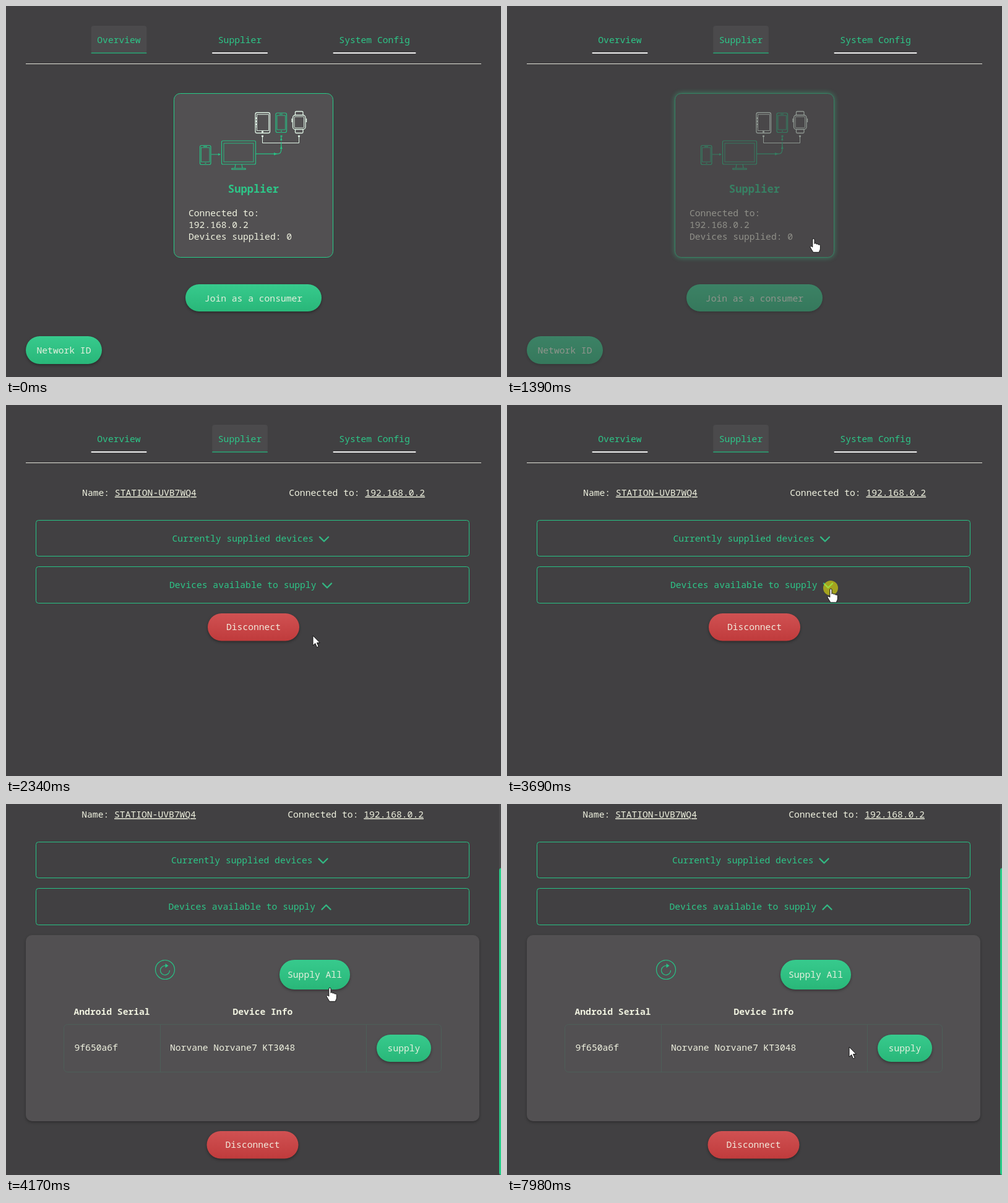
These frames come from a looping animation (800x600 px, 8 s). An HTML page:

```html
<!DOCTYPE html>
<html lang="en">
<head>
<meta charset="utf-8">
<title>Device supplier</title>
<style>
html, body { margin: 0; width: 100%; height: 100%; overflow: hidden; background: #414042; }
svg { overflow: visible; }
#stage { display: block; overflow: hidden; }
text { font: 14.66px "Noto Sans Mono", monospace; fill: #f0f2e0; white-space: pre; }
.mid { text-anchor: middle; }
.bold { font-weight: bold; }
.green { fill: #2dc688; }
.u { text-decoration: underline; }
.line { fill: none; stroke: #27c285; }
.pale { fill: none; stroke: #e2f6e8; }
.btn { filter: drop-shadow(0 2px 2px rgba(0,0,0,.35)); }
.btn text { fill: #e4f0de; }
.tab rect { fill: none; }
.tab path { stroke: #f0f0f0; stroke-width: 2; }
.tab.on rect { fill: #4b4a4c; }
.tab.on path { stroke: #2f8f6a; }
.wide { width: calc(100% - 96px); }
.full { width: calc(100% - 64px); }
.chev { fill: none; stroke: #32b883; stroke-width: 2.3; stroke-linecap: round; stroke-linejoin: round; }
.grid { fill: none; stroke: #4d5f59; }
.thumb { fill: #27cc88; }
.track { fill: #4c4b4d; }
.cur { fill: #fff; stroke: #111; stroke-linejoin: round; }
</style>
</head>
<body>
<svg id="stage" width="800" height="600">
  <defs>
    <linearGradient id="gg" x2="0" y2="1"><stop stop-color="#37ca8d"/><stop offset="1" stop-color="#29b779"/></linearGradient>
    <linearGradient id="gl" x2="0" y2="1"><stop stop-color="#43cd93"/><stop offset="1" stop-color="#2ec587"/></linearGradient>
    <linearGradient id="gr" x2="0" y2="1"><stop stop-color="#d05152"/><stop offset="1" stop-color="#c03b3c"/></linearGradient>
  </defs>

  <g id="scroll">
  <svg id="page" width="800" height="600">
    <svg x="22.81%"><g class="tab"><rect x="-44.8" y="32" width="89.6" height="44" rx="4"/><path d="M-44.8 76h89.6"/><text class="mid green" y="60">Overview</text></g></svg>
    <svg x="47.25%"><g class="tab"><rect x="-44.8" y="32" width="89.6" height="44" rx="4"/><path d="M-44.8 76h89.6"/><text class="mid green" y="60">Supplier</text></g></svg>
    <svg x="74.44%"><g class="tab"><rect x="-66.8" y="32" width="133.6" height="44" rx="4"/><path d="M-66.8 76h133.6"/><text class="mid green" y="60">System Config</text></g></svg>
    <rect class="full" x="32" y="93" height="1" fill="#e3e3da"/>

    <g id="overview">
      <rect id="card" x="271.5" y="141.5" width="257" height="265" rx="10" fill="#525052" stroke="#27cc88"/>
      <g class="pale" stroke-width="1.3">
        <rect x="403" y="172.5" width="23.5" height="33" rx="2.5"/>
        <rect x="405.5" y="175.5" width="19" height="26" stroke-width=".9"/>
        <path d="M404.5 180v16" stroke-dasharray="3 2"/>
        <path d="M413 203.5h3M413 210.5h3M472 210.5h3" stroke-width="2.4"/>
        <path d="M414.5 210V221.5H473.5V210" stroke-width="1"/>
        <rect x="463.5" y="176.5" width="20.500" height="23" rx="4"/>
        <rect x="466" y="179" width="15.500" height="18" rx="1" stroke-width=".9"/>
        <path d="M467.500 176v-4q0-1.500 1.500-1.500h9.500q1.500 0 1.500 1.500v4M467.500 200v4q0 1.500 1.500 1.500h9.500q1.500 0 1.500-1.500v-4M462 182v6M485.500 182v6"/>
      </g>
      <g class="line" stroke-width="1.2">
        <rect x="436" y="173" width="17.500" height="31.500" rx="2.5"/>
        <rect x="438" y="177" width="13.500" height="23" stroke-width=".9"/>
        <path d="M442 175h5M444 202.300h2"/>
        <rect x="313.500" y="225.500" width="17.500" height="31" rx="2.5"/>
        <rect x="315.500" y="229" width="13.500" height="23" stroke-width=".9"/>
        <path d="M319 227.300h6M321.500 254.300h2M332 240h13"/>
        <rect x="348.500" y="218" width="55" height="38" rx="2"/>
        <rect x="352" y="222" width="48" height="30" stroke-width=".9"/>
        <path d="M371 256l-1 6M381 256l1 6M365 262.500h22v2h-22z"/>
        <path d="M404 239.200H439Q444.800 239.200 444.800 232V222"/>
        <path d="M444.800 222V210" stroke-dasharray="2 2"/>
        <path d="M443.500 210.500h3" stroke-width="2.400"/>
        <path d="M343 238l4 2-4 2zM433 237l5.500 2.200-5.500 2.200zM442.800 231l2-5 2 5zM443 217l1.800-4 1.800 4z" fill="#27c285" stroke="none"/>
      </g>
      <text class="mid bold green" x="400" y="302" style="font-size:17.15px">Supplier</text>
      <g id="info">
        <text x="295" y="340">Connected to:</text>
        <text x="295" y="359">192.168.0.2</text>
        <text x="295" y="378">Devices supplied: 0</text>
      </g>
      <g class="btn"><rect x="290" y="450" width="220" height="44" rx="22" fill="url(#gg)"/><text class="mid" x="400" y="478">Join as a consumer</text></g>
      <g class="btn"><rect x="32" y="534" width="123" height="45" rx="22.5" fill="url(#gg)"/><text class="mid" x="93.500" y="562">Network ID</text></g>
    </g>

    <g id="supplier">
      <text class="mid" x="26.93%" y="147">Name: <tspan class="u">STATION-UVB7WQ4</tspan></text>
      <text class="mid" x="70.9%" y="147">Connected to: <tspan class="u">192.168.0.2</tspan></text>
      <rect class="line wide" x="48.5" y="186.5" height="58" rx="4" style="width:calc(100% - 97px)"/>
      <rect class="line wide" x="48.5" y="261.500" height="59" rx="4" style="width:calc(100% - 97px)"/>
      <svg x="50%">
        <text class="green" x="-131.500" y="221">Currently supplied devices</text>
        <path class="chev" d="M107 213.500l7 7 7-7"/>
        <text class="green" x="-136" y="296">Devices available to supply</text>
        <path class="chev" id="chev"/>
        <g class="btn" id="leave"><rect x="-74" y="337" width="148" height="44.500" rx="22.200" fill="url(#gr)"/><text class="mid" y="364" style="fill:#f2eadc">Disconnect</text></g>
      </svg>
      <g id="panel">
        <rect class="full" x="32" y="337" height="301" rx="10" fill="#525052" style="filter:drop-shadow(0 2px 2px rgba(0,0,0,.3))"/>
        <g class="line" stroke-width="1.2">
          <circle cx="257" cy="393" r="15.500"/>
          <path d="M264.500 394A7.500 7.500 0 1 1 259 386.800"/>
          <path d="M257.500 383l5 3.500-5 3.500z" fill="#27c285" stroke="none"/>
        </g>
        <g class="btn">
          <rect x="442" y="377" width="114" height="48" rx="24" fill="url(#gg)"/>
          <rect id="hover" x="442" y="377" width="114" height="48" rx="24" fill="url(#gl)"/>
          <text class="mid" x="499" y="406">Supply All</text>
        </g>
        <text class="bold" x="109.500" y="466">Android Serial</text>
        <text class="bold" x="366.500" y="466">Device Info</text>
        <rect class="grid" x="93.500" y="481.500" width="610" height="77" rx="6"/>
        <path class="grid" d="M249.500 482v76M582.500 482v76"/>
        <text x="110.500" y="524">9f650a6f</text>
        <text x="265" y="524">Norvane Norvane7 KT3048</text>
        <g class="btn"><rect x="599" y="498" width="88" height="44" rx="22" fill="url(#gg)"/><text class="mid" x="643" y="525">supply</text></g>
      </g>
    </g>
  </svg>
  </g>

  <g id="vbar"><rect class="track" x="797" width="3" height="600"/><rect class="thumb" id="vthumb" x="797" width="8" rx="4"/></g>
  <g id="hbar"><rect class="track" y="592" width="797" height="8"/><rect class="thumb" id="hthumb" y="592" height="8" rx="4"/><rect x="797" y="592" width="3" height="8" fill="#ddd"/></g>

  <g id="cursor">
    <circle id="click" r="12" fill="#ff0" fill-opacity=".52"/>
    <path class="cur" id="arrow" d="M0 0V16l3.800-3.500 2.700 6.300 2.700-1.200-2.700-6H11.300Z"/>
    <path class="cur" id="hand" d="M-1.200 3Q-1.200 1.200 .4 1.200T2 3V9.500Q2.400 8.500 3.700 8.700T5.200 10.300Q5.600 9.500 6.800 9.700T8.300 11.300Q8.700 10.600 9.900 10.900T11.400 12.600V17Q11.400 19.500 9.800 21.500V23.300H-.4Q-1 21.300-2.800 19L-4.700 15.600Q-5.300 14.200-4.100 13.600T-1.200 15Z"/>
  </g>
</svg>

<script>
const $ = id => document.getElementById(id);
const tabs = document.querySelectorAll('.tab');
const clamp = v => Math.max(0, Math.min(1, v));
const show = (id, on) => $(id).style.display = on ? '' : 'none';
const set = (id, name, value) => $(id).setAttribute(name, value);
const held = (t, start, size) => start + Math.floor((t - start) / size) * size;
const smooth = p => p * p * (3 - 2 * p);

// progress in n equal jumps, the first at a and the last at b
const steps = (t, a, b, n) =>
  clamp((Math.floor((t - a) / ((b - a) / (n - 1)) + 1e-6) + 1) / n);

function pointer(t) {
  const mix = (a, b, p) => a.map((v, i) => v + (b[i] - v) * p);
  if (t < 2290) return mix([554, 407.5], [495, 375], steps(t, 500, 750, 5));
  if (t < 6030) return mix([495, 375], [523, 296], smooth(steps(t, 2290, 3020, 12)));
  if (t < 6860) return mix([523, 296], [511, 388], smooth(steps(t, 6098, 6780, 11)));
  if (t < 7840) return mix([511, 388], [511, 393], steps(t, 6860, 6920, 2));
  return mix([511, 393], [553, 393], steps(t, 7840, 7980, 3));
}

function draw(t) {
  const second = t >= 1520, open = t >= 3820;

  // page change
  const rest = (1 - clamp((held(t, 1520, 70) - 1520) / 490)) ** 3;
  const offset = 318 * rest, wide = second && offset > 18;
  tabs[0].classList.toggle('on', t < 1250);
  tabs[1].classList.toggle('on', t >= 1250);
  show('overview', !second);
  set('overview', 'opacity', 1 - clamp((held(t, 1250, 70) - 1250) / 270));
  show('supplier', second);
  set('supplier', 'opacity', 1 - rest);
  set('supplier', 'transform', `translate(${offset})`);

  // hovered card
  const glow = steps(t, 560, 750, 4);
  $('card').style.filter = t < 560 ? 'none' : `drop-shadow(0 0 4px rgba(60,220,150,${glow * .9}))`;
  set('info', 'opacity', 1 - glow * .07);

  // opened list and scrolling
  const p = clamp((held(t, 3810, 70) - 3818) / 342);
  const top = open ? Math.round(125 * Math.sin(p * Math.PI / 2)) : 0;
  show('panel', open);
  set('chev', 'd', open ? 'M112 295.500l7-7 7 7' : 'M112 288.500l7 7 7-7');
  set('leave', 'transform', `translate(0 ${open ? 317 : 0})`);
  set('scroll', 'transform', `translate(0 ${-top})`);
  set('page', 'width', wide || open ? 797 : 800);
  set('hover', 'opacity', t < 6030 ? 0 : 1 - clamp((t - 6240) / 160));

  // scrollbars
  const view = wide ? 592 : 600, total = open ? 725 : 600;
  show('vbar', wide || open);
  show('hbar', wide);
  set('vthumb', 'y', top * view / total);
  set('vthumb', 'height', view * view / total);
  set('hthumb', 'width', 797 * 797 / (779 + offset));

  // pointer
  const [x, y] = pointer(t);
  const hand = second ? t > 2290 && y < (open ? 300 : 321) : x < 529;
  show('cursor', t >= 500);
  set('cursor', 'transform', `translate(${Math.round(x)} ${Math.round(y)})`);
  show('hand', hand);
  show('arrow', !hand);
  show('click', t >= 1170 && t < 1250 || t >= 3690 && t < 3820);
}

const start = performance.now();
function tick() {
  draw((performance.now() - start) % 8000);
  requestAnimationFrame(tick);
}
tick();
</script>
</body>
</html>
```
